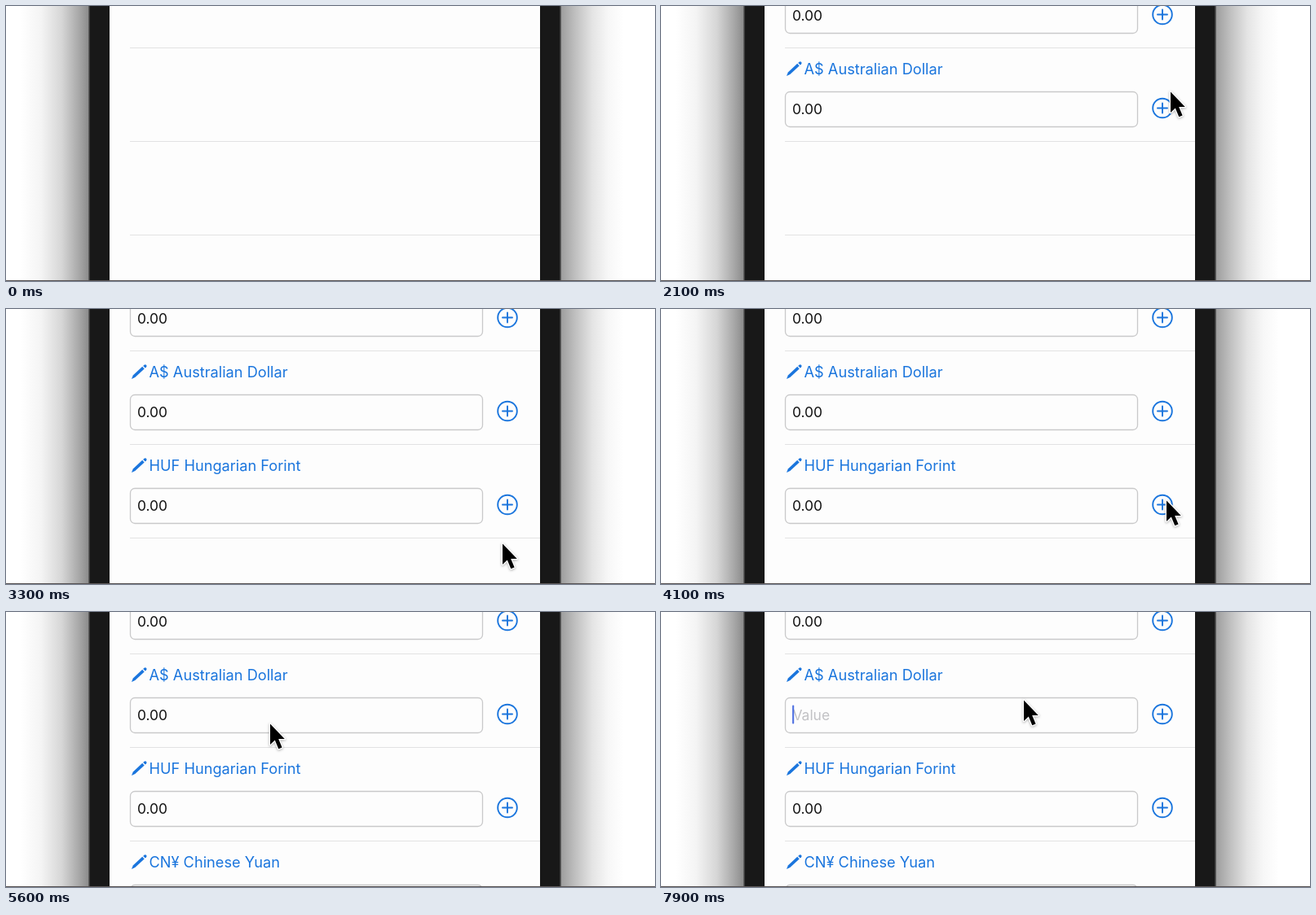
An HTML page that plays this animation: 796x338 px, repeating every 8 s.

```html
<!DOCTYPE html>
<html lang="en">
<head>
<meta charset="utf-8">
<title>Currency list</title>
<style>
  html, body { margin: 0; width: 100%; height: 100%; overflow: hidden; background: #fff; }
  svg { display: block; width: 796px; height: 338px; font-family: Inter, "Liberation Sans", sans-serif; }
  .title { font-size: 18.2px; fill: #1a75dd; }
  .value { font-size: 17.4px; fill: #111; }
  .line { stroke: #e2e2e3; }
  .hint { fill: #c2c2c5; }

  .row, .digit, #hint, #caret, #clear, #pointer { animation: 8s step-end infinite; }

  /* rows fade in two steps */
  .row { opacity: 0; }
  #row1 { animation-name: row1; }
  #row2 { animation-name: row2; }
  #row3 { animation-name: row3; }
  #row4 { animation-name: row4; }
  @keyframes row1 { 0% { opacity: 0 } 7.5% { opacity: 0; animation-timing-function: steps(2) } 10%, 100% { opacity: 1 } }
  @keyframes row2 { 0% { opacity: 0 } 21.25% { opacity: 0; animation-timing-function: steps(2) } 23.75%, 100% { opacity: 1 } }
  @keyframes row3 { 0% { opacity: 0 } 35% { opacity: 0; animation-timing-function: steps(2) } 37.5%, 100% { opacity: 1 } }
  @keyframes row4 { 0% { opacity: 0 } 55% { opacity: 0; animation-timing-function: steps(2) } 57.5%, 100% { opacity: 1 } }

  /* the value is deleted from its end */
  #d1 { animation-name: del1; }
  #d2 { animation-name: del2; }
  #d3 { animation-name: del3; }
  #d4 { animation-name: del4; }
  @keyframes del4 { 0% { visibility: visible } 85%, 100% { visibility: hidden } }
  @keyframes del3 { 0% { visibility: visible } 87.5%, 100% { visibility: hidden } }
  @keyframes del2 { 0% { visibility: visible } 88.75%, 100% { visibility: hidden } }
  @keyframes del1 { 0% { visibility: visible } 91.25%, 100% { visibility: hidden } }

  #hint { animation-name: hint; }
  @keyframes hint { 0% { visibility: hidden } 91.25%, 100% { visibility: visible } }

  #clear { animation-name: clear; }
  @keyframes clear { 0% { visibility: hidden } 81.25% { visibility: visible } 91.25%, 100% { visibility: hidden } }

  #caret { animation-name: caret; }
  @keyframes caret {
    0% { opacity: 0; transform: translateX(198px) }
    81.25% { opacity: 1; transform: translateX(198px) }
    85% { opacity: 1; transform: translateX(187px) }
    87.5% { opacity: 1; transform: translateX(176px) }
    88.75% { opacity: 1; transform: translateX(171px) }
    91.25% { opacity: 1; transform: translateX(161px) }
    98.75%, 100% { opacity: .9; transform: translateX(161px) }
  }

  #pointer { animation-name: pointer; filter: drop-shadow(0 1.5px 1.5px rgba(0, 0, 0, .3)); }
  @keyframes pointer {
    0%     { transform: translate(612px, -45px) }
    16.25% { transform: translate(612px, -45px); animation-timing-function: steps(2) }
    18.75% { transform: translate(614px, 2px) }
    20%    { transform: translate(615px, 11px) }
    21.25% { transform: translate(615px, 11px); animation-timing-function: steps(4) }
    26.25% { transform: translate(624px, 104px); animation-timing-function: steps(2) }
    28.75% { transform: translate(618px, 158px); animation-timing-function: steps(3) }
    32.5%  { transform: translate(611px, 129px) }
    33.75% { transform: translate(617px, 116px) }
    35%    { transform: translate(617px, 116px); animation-timing-function: steps(5) }
    41.25% { transform: translate(608px, 287px); animation-timing-function: steps(2) }
    43.75% { transform: translate(613px, 253px) }
    45%    { transform: translate(613px, 253px); animation-timing-function: steps(5) }
    51.25% { transform: translate(619px, 234px) }
    60%    { transform: translate(619px, 234px); animation-timing-function: steps(3) }
    63.75% { transform: translate(470px, 125px); animation-timing-function: steps(2) }
    66.25% { transform: translate(385px, 95px); animation-timing-function: steps(3) }
    70%    { transform: translate(323px, 136px) }
    73.75% { transform: translate(323px, 136px); animation-timing-function: steps(5) }
    80%, 100% { transform: translate(444px, 107px) }
  }
</style>
</head>
<body>
<svg viewBox="0 0 796 338">
  <defs>
    <linearGradient id="shadeL">
      <stop offset="0" stop-color="#fff"/>
      <stop offset=".3" stop-color="#f4f4f4"/>
      <stop offset=".6" stop-color="#d6d6d6"/>
      <stop offset=".85" stop-color="#a8a8a8"/>
      <stop offset="1" stop-color="#8a8a8a"/>
    </linearGradient>
    <linearGradient id="shadeR">
      <stop offset="0" stop-color="#9c9c9c"/>
      <stop offset=".25" stop-color="#c2c2c2"/>
      <stop offset=".5" stop-color="#e4e4e4"/>
      <stop offset=".75" stop-color="#f7f7f7"/>
      <stop offset="1" stop-color="#fff"/>
    </linearGradient>
    <g id="field">
      <rect x="152.5" y="105.5" width="432" height="43" rx="5.5" fill="#fdfdfd" stroke="#c9c9ca" stroke-width="1.3"/>
      <g fill="none" stroke="#1a75dd" stroke-width="1.9" stroke-linecap="round">
        <circle cx="615" cy="125.5" r="11.8"/>
        <path d="M609 125.5h12M615 119.5v12"/>
      </g>
    </g>
    <g id="pencil" fill="#1a75dd">
      <path d="M154 86l1.8-4.6 11.4-10.6 2.5 2.6-11.4 10.7z"/>
      <path d="M168.2 69.9l1.3-1.2q1.3-1 2.5.1t.1 2.5l-1.3 1.3z"/>
    </g>
  </defs>

  <rect width="796" height="338" fill="#fff"/>
  <rect x="18" width="84" height="338" fill="url(#shadeL)"/>
  <rect x="680" width="78" height="338" fill="url(#shadeR)"/>
  <rect x="101" width="580" height="338" fill="#5c5c5c"/>
  <rect x="102.5" width="577" height="338" fill="#181818"/>
  <rect x="127" width="528" height="338" fill="#fdfdfd"/>
  <path class="line" d="M152 51.5h503M152 166.5h503M152 281.5h503"/>

  <g id="row1" class="row">
    <g transform="translate(0 -115)">
      <use href="#field"/>
      <text class="value" x="161" y="132.5">0.00</text>
    </g>
  </g>

  <g id="row2" class="row">
    <use href="#pencil"/>
    <text class="title" x="175.5" y="83.7">A$ Australian Dollar</text>
    <use href="#field"/>
    <text class="value" x="161" y="132.5"><tspan id="d1" class="digit">0</tspan><tspan id="d2" class="digit">.</tspan><tspan id="d3" class="digit">0</tspan><tspan id="d4" class="digit">0</tspan></text>
    <text id="hint" class="value hint" x="161.5" y="132.5">Value</text>
    <g id="clear">
      <circle cx="565.5" cy="126" r="9" fill="#c5c5c8"/>
      <path d="M562 122.5l7 7m0-7l-7 7" stroke="#fff" stroke-width="1.6" stroke-linecap="round"/>
    </g>
    <rect id="caret" y="114.5" width="2.2" height="23" rx="1" fill="#4568e0"/>
  </g>

  <g id="row3" class="row">
    <g transform="translate(0 115)">
      <use href="#pencil"/>
      <text class="title" x="175.5" y="83.7">HUF Hungarian Forint</text>
      <use href="#field"/>
      <text class="value" x="161" y="132.5">0.00</text>
    </g>
  </g>

  <g id="row4" class="row">
    <g transform="translate(0 230)">
      <use href="#pencil"/>
      <text class="title" x="175.5" y="83.7">CN¥ Chinese Yuan</text>
      <use href="#field"/>
    </g>
  </g>

  <rect y="337" width="796" height="1" fill="#5a5555"/>

  <g id="pointer">
    <path d="M1 1.5V27l5.8-5.4 4.5 10.6 4.3-1.8-4.4-10.4h7.6z" fill="#000" stroke="#fff" stroke-width="2.6" stroke-linejoin="round" paint-order="stroke"/>
  </g>
</svg>
</body>
</html>
```
